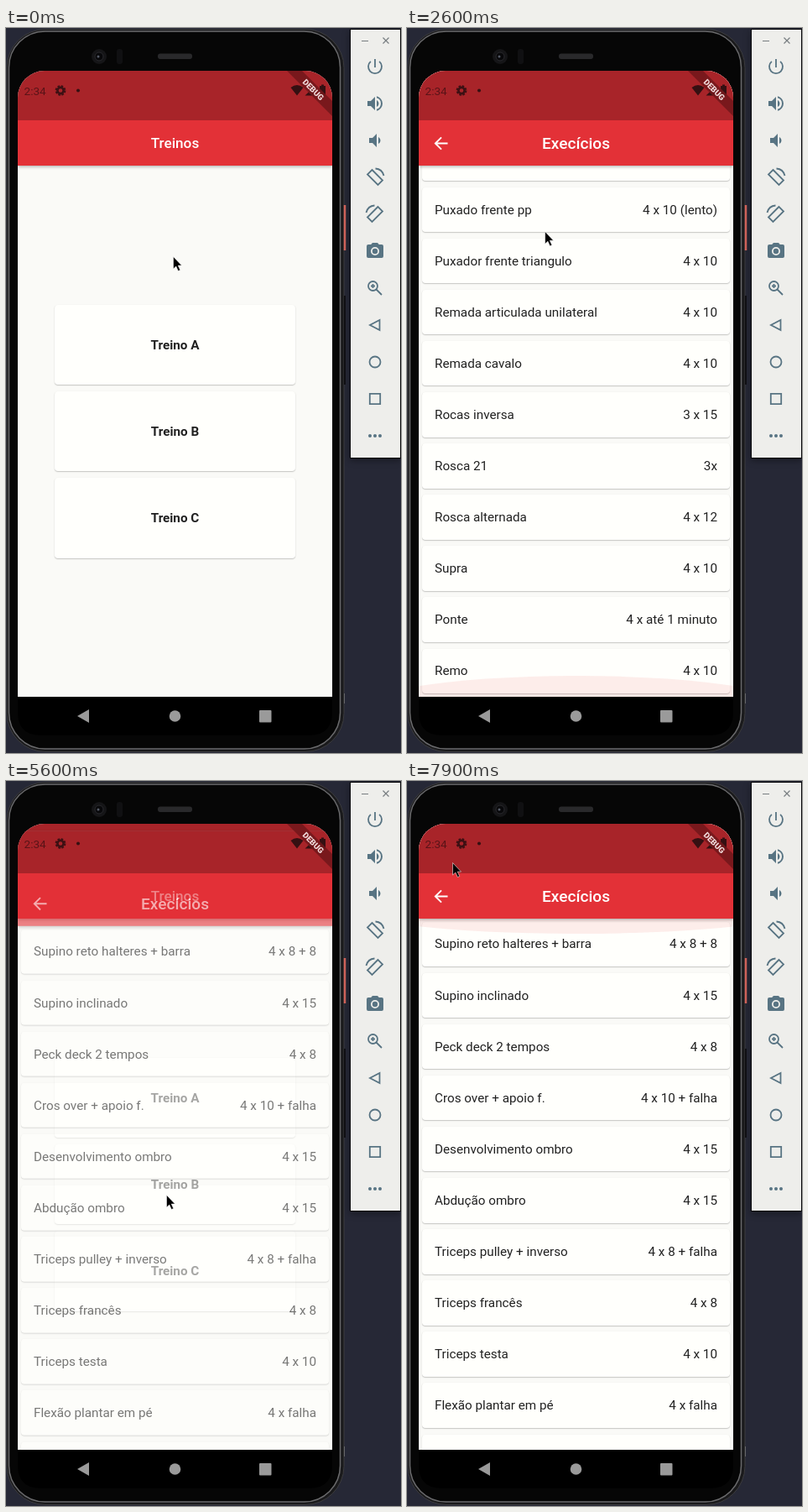
An HTML page that plays this animation: 471x864 px, repeating every 8000 ms.

```html
<!DOCTYPE html>
<html lang="pt">
<head>
<meta charset="utf-8">
<style>
html, body { margin: 0; width: 100%; height: 100%; overflow: hidden; background: #262836; }
body { position: relative; font-family: Roboto, sans-serif; color: #212121; }
svg { position: absolute; left: 0; top: 0; }
#screen { position: absolute; left: 14px; top: 51px; width: 375px; height: 746px; overflow: hidden; border-radius: 32px 32px 0 0; }
.page { position: absolute; inset: 0; background: #fafaf7; }
.bar { position: absolute; left: 0; top: 0; width: 375px; height: 113px; background: #e33137; box-shadow: 0 1px 4px rgba(0,0,0,.35); }
.title { position: absolute; top: 59px; width: 100%; line-height: 55px; text-align: center; color: #fff; font-weight: 500; font-size: 19.08px; }
#home .title { font-size: 17.17px; }
.card { position: absolute; box-sizing: border-box; background: #fffffc; border-radius: 3.8px; box-shadow: 0 .8px 1.3px rgba(0,0,0,.27); font-size: 15.26px; display: flex; align-items: center; white-space: pre; }
#home .card { left: 44px; width: 287px; height: 95.4px; justify-content: center; font-weight: 700; }
#view { position: absolute; left: 0; top: 113px; width: 375px; height: 633px; overflow: hidden; }
#list .card { left: 3.8px; width: 367.4px; height: 53.4px; padding: 0 15.2px; justify-content: space-between; }
.glow { position: absolute; left: -93.5px; width: 562px; border-radius: 50%; background: rgba(227,49,55,.085); }
#status { position: absolute; left: 0; top: 0; width: 375px; height: 59px; background: rgba(0,0,0,.26); }
#panel { filter: drop-shadow(0 2px 4px rgba(0,0,0,.4)); }
</style>
</head>
<body>
<svg width="471" height="864" fill="none">
  <rect x="1" y="1.5" width="402" height="861" rx="46" fill="#1a1a1c" stroke="#3c3c3f"/>
  <rect x="3.5" y="4" width="395" height="855" rx="43" fill="#060606" stroke="#6a6a6c" stroke-width="1.5"/>
  <path d="M14 797H389V815Q389 843 361 843H42Q14 843 14 815Z" fill="#000"/>
  <circle cx="111" cy="34" r="9" fill="#151517"/>
  <circle cx="111" cy="34" r="5" fill="#08080a" stroke="#29292d"/>
  <circle cx="110" cy="34" r="1.5" fill="#555b66"/>
  <rect x="132" y="25" width="7" height="18" rx="3" fill="#101012"/>
  <rect x="181" y="30.5" width="41" height="6.5" rx="3" fill="#29292b"/>
  <path d="M404 211V265" stroke="#d5655c" stroke-width="2.5"/>
  <path d="M404 319V425" stroke="#101014" stroke-width="2"/>
  <path d="M403.5 793V805" stroke="#66666a"/>
  <g fill="#9a9a9a"><path d="M85 820L99 812V828Z"/><circle cx="201.5" cy="820" r="6.8"/><rect x="302" y="813" width="14.5" height="14.5" rx="1"/></g>
  <rect id="panel" x="410.5" y="1.5" width="60" height="511" fill="#eeeeeb" stroke="#08080a"/>
  <path d="M424 15.5H432M449.5 11.5L456.5 18.5M456.5 11.5L449.5 18.5" stroke="#777d80" stroke-width="1.2"/>
  <g id="tools" fill="#587483"></g>
</svg>

<div id="screen">
  <div class="page" id="home"><div class="bar"><div class="title">Treinos</div></div></div>
  <div class="page" id="detail">
    <div id="view"><div id="list"></div><div class="glow" id="topGlow"></div><div class="glow" id="endGlow"></div></div>
    <div class="bar"><div class="title">Execícios</div>
      <svg width="60" height="113" fill="none" stroke="#fff" stroke-width="1.9"><path d="M34.5 86.5H20.5M27 79.3L19.8 86.5L27 93.7"/></svg>
    </div>
  </div>
  <div id="status"><svg width="375" height="59" fill="#351012">
    <text x="7.5" y="28.5" font-size="13.6" fill="#5a1418">2:34</text>
    <g fill="none" stroke="#3c1013" stroke-width="2.6"><circle cx="51" cy="23.5" r="3.6"/><circle cx="51" cy="23.5" r="5.4" stroke-width="2" stroke-dasharray="2.6 1.64"/></g>
    <circle cx="72" cy="23.5" r="2"/>
    <path d="M325.5 20Q333 14 340.5 20L333 29.5ZM342.5 29.5L355 17.5V29.5ZM360 18H362V16.5H365V18H367V30H360Z"/>
  </svg></div>
  <svg width="375" height="113">
    <path d="M321 0H339L375 36V54Z" fill="#74171b" fill-opacity=".88"/>
    <text transform="translate(352.5 22.5) rotate(45)" text-anchor="middle" y="3.5" font-size="9.73" font-weight="900" fill="#f0dada">DEBUG</text>
  </svg>
</div>

<svg width="471" height="864"><path id="cursor" d="M0 0V14.5L3.3 11.5L5.8 17L8.2 16L5.7 10.6H10Z" fill="#000" stroke="#fff" stroke-opacity=".65" stroke-width=".8"/></svg>

<script>
const $ = id => document.getElementById(id);

const solid = d => `<path fill-rule="evenodd" d="${d}"/>`;
const outline = d => `<path d="${d}" fill="none" stroke="#587483" stroke-width="1.8"/>`;
const speaker = 'c0-1.77-1.02-3.29-2.5-4.03v8.05c1.48-.73 2.5-2.25 2.5-4.02z';
const rotate = outline('M8.5 3L21 15.5L15.5 21L3 8.5ZM12.5 1.5Q20.5 2 22.5 10');
$('tools').innerHTML = [
  outline('M12 3V13M17.1 5.9A8 8 0 1 1 6.9 5.9'),
  solid('M3 9v6h4l5 5V4L7 9zM16.5 12' + speaker + 'M14 3.23v2.06a7 7 0 0 1 0 13.42v2.06a9 9 0 0 0 0-17.54z'),
  solid('M5 9v6h4l5 5V4L9 9zM18.5 12' + speaker),
  rotate,
  `<g transform="matrix(-1 0 0 1 24 0)">${rotate}</g>`,
  solid('M9 2L7.2 4H4a2 2 0 0 0-2 2v12a2 2 0 0 0 2 2h16a2 2 0 0 0 2-2V6a2 2 0 0 0-2-2h-3.2L15 2zM12 7a5 5 0 1 1 0 10a5 5 0 1 1 0-10z') + '<circle cx="12" cy="12" r="3.2"/>',
  outline('M15 9.5A5.5 5.5 0 1 1 4 9.5A5.5 5.5 0 1 1 15 9.5M13.5 13.5L20 20M9.5 7V12M7 9.5H12'),
  outline('M17.5 6V18L6 12Z'),
  outline('M18.5 12A6.5 6.5 0 1 1 5.5 12A6.5 6.5 0 1 1 18.5 12Z'),
  outline('M5.8 5.8H18.2V18.2H5.8Z'),
  [6, 12, 18].map(x => `<circle cx="${x}" cy="12" r="2"/>`).join('')
].map((icon, i) => `<g transform="translate(428 ${34 + 44 * i})">${icon}</g>`).join('');

const card = (top, html) => `<div class="card" style="top:${top}px">${html}</div>`;
$('home').innerHTML += ['A', 'B', 'C'].map((c, i) => card(279 + 103.1 * i, 'Treino ' + c)).join('');

const buildList = text => text.split('|').map((row, i) =>
  card(3.8 + 61.07 * i, row.split(';').map(s => `<span>${s}</span>`).join(''))).join('');
const back = buildList('Barra fixa graviton;3 x falha|Puxado frente pp;4 x 10 (lento)|Puxador frente triangulo;4 x 10|Remada articulada unilateral;4 x 10|Remada cavalo;4 x 10|Rocas inversa;3 x 15|Rosca 21;3x|Rosca alternada;4 x 12|Supra;4 x 10|Ponte;4 x até 1 minuto|Remo;4 x 10');
const chest = buildList('Supino reto halteres + barra;4 x 8 + 8|Supino inclinado;4 x 15|Peck deck 2 tempos;4 x 8|Cros over + apoio f.;4 x 10 + falha|Desenvolvimento ombro;4 x 15|Abdução ombro;4 x 15|Triceps pulley + inverso;4 x 8 + falha|Triceps francês;4 x 8|Triceps testa;4 x 10|Flexão plantar em pé;4 x falha|Flexão plantar em sentado;4 x falha');

const progress = (t, start, length) => Math.max(0, Math.min(1, (t - start) / length));

function bezier(x1, y1, x2, y2, x) {
  const at = (a, b, s) => 3 * a * s * (1 - s) ** 2 + 3 * b * s * s * (1 - s) + s ** 3;
  let lo = 0, hi = 1;
  for (let i = 0; i < 20; i++) {
    const mid = (lo + hi) / 2;
    if (at(x1, x2, mid) < x) lo = mid; else hi = mid;
  }
  return at(y1, y2, lo);
}

// Each visit swipes the list up, then down again.
const swipeTime = 810;
const swipe = up => [
  { at: up, for: swipeTime, to: [161, 221] },
  { at: up + swipeTime, for: 300, to: [165, 420] }
];
const visits = [1845, 6290];
const moves = [
  { at: 0, for: 400, to: [207, 406] },
  { at: 1000, for: 600, to: [207, 533] },
  ...swipe(visits[0]),
  { at: 2955, for: 245, to: [107, 214] },
  { at: 3200, for: 800, to: [44, 144] },
  { at: 4300, for: 200, to: [66, 231] },
  { at: 4500, for: 800, to: [191, 493] },
  { at: 5700, for: 500, to: [191, 533] },
  ...swipe(visits[1]),
  { at: 7400, for: 500, to: [54, 97] }
];

const pointer = t => moves.reduce((p, m) =>
  p.map((v, i) => v + (m.to[i] - v) * progress(t, m.at, m.for)), [199, 272]);

// The glow swells and fades once the list has hit its limit.
function setGlow(id, side, t, start) {
  const depth = 42 * Math.sin(Math.PI * progress(t, start + 200, 700));
  const height = 562 * depth / 150;
  $(id).style.height = height + 'px';
  $(id).style[side] = depth - height + 'px';
}

let shown;
function draw() {
  // The screen advances ten times a second.
  const t = Math.floor(performance.now() % 8000 / 100) * 100;
  const second = t >= 5000;
  const list = second ? chest : back;
  if (list !== shown) $('list').innerHTML = shown = list;

  const open = progress(t, second ? 5380 : 680, 300) - (second ? 0 : progress(t, 4327, 300));
  const detail = $('detail').style;
  detail.display = open ? '' : 'none';
  detail.opacity = bezier(.42, 0, 1, 1, open);
  detail.transform = `translateY(${186.5 * (1 - bezier(.4, 0, .2, 1, open))}px)`;

  const up = visits[+second], down = up + swipeTime;
  const scroll = 39 * (progress(t, up, 150) - progress(t, down, 150));
  $('list').style.transform = `translateY(${-scroll}px)`;
  setGlow('endGlow', 'bottom', t, up);
  setGlow('topGlow', 'top', t, down);
  $('cursor').setAttribute('transform', `translate(${pointer(t).map(v => v + .5)})`);
  requestAnimationFrame(draw);
}
draw();
</script>
</body>
</html>
```
